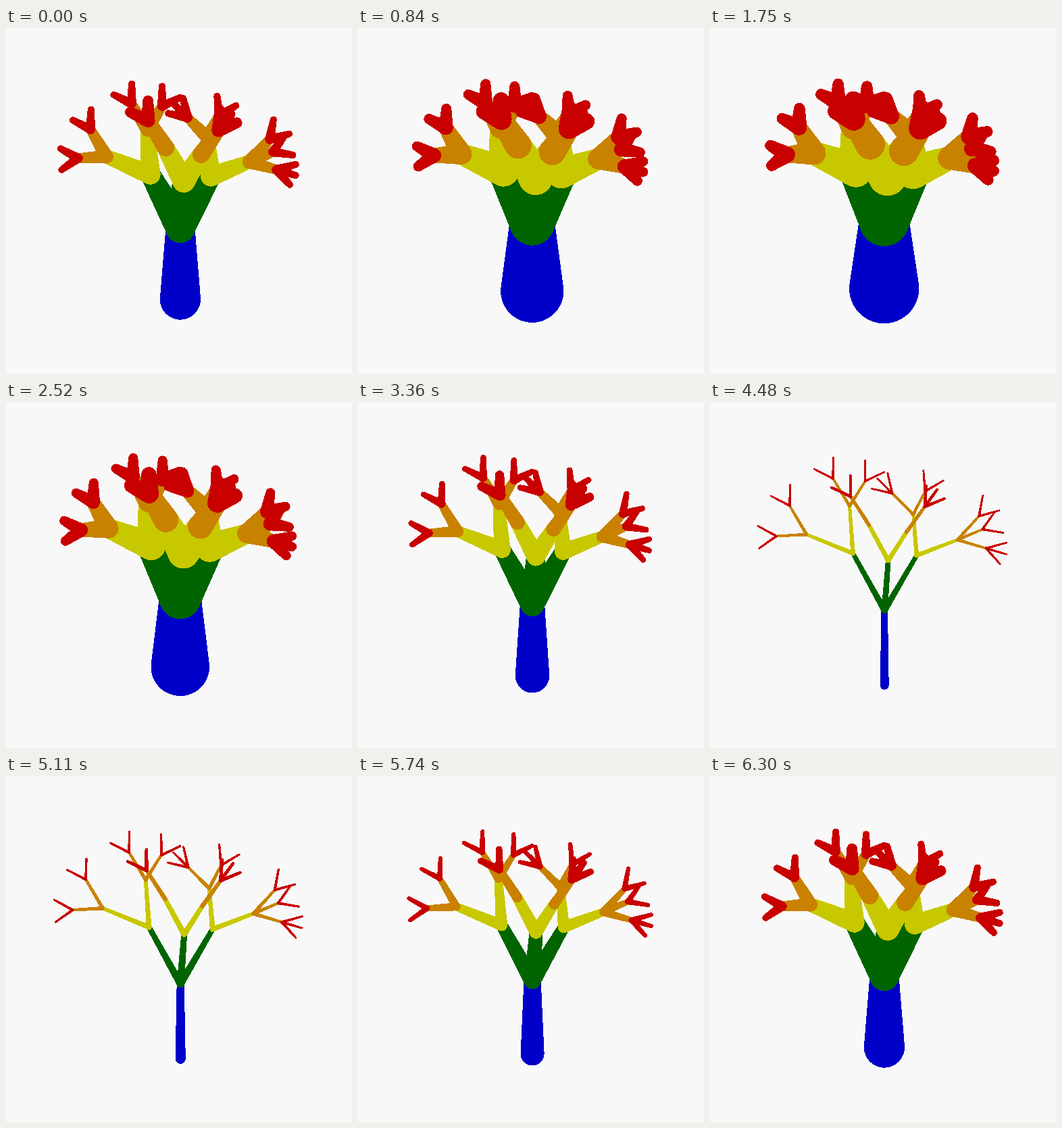
Write an HTML page that moves like this. It is 512 by 512 pixels and loops after 6.37 s.

```html
<!DOCTYPE html>
<html>
<head>
<meta charset="utf-8">
<style>
html, body { margin: 0; height: 100%; overflow: hidden; background: #f8f8f8; }
svg { display: block; width: 512px; height: 512px; }
</style>
</head>
<body>
<svg viewBox=".3 .3 512 512" shape-rendering="crispEdges"></svg>
<script>
const STEP = 70, STEPS = 91;
const TWIG = 31, FAN = 32 * Math.PI / 180;
const TRUNK_TAPER = .71, TAPER = .68, NEAR_TAPER = .77;

const joint = (x, y, ...children) => ({ x, y, children });

// A joint that ends in a fan of twigs around the direction it grew in.
const fan = (x, y, count = 2) => ({ x, y, count });

function sprout({ x, y, count }, from) {
  const dir = Math.atan2(y - from.y, x - from.x);
  return Array.from({ length: count }, (_, i) => {
    const angle = dir + FAN * (2 * i / (count - 1) - 1);
    return joint(x + TWIG * Math.cos(angle), y + TWIG * Math.sin(angle));
  });
}

const left = joint(212, 224,
  joint(143.5, 196, fan(118.5, 153.5), fan(99, 198.5)),
  joint(207, 154, fan(182.5, 113.5), fan(230, 117.5)));
const middle = joint(264, 234.5,
  joint(235.5, 182, fan(208.5, 140)),
  joint(291, 192.5, fan(318, 155, 3)));
const right = joint(306, 227,
  joint(301, 166.5, fan(270, 135.5, 3), fan(318.5, 132.5)),
  joint(366, 204, fan(398, 169), fan(403, 188.5), fan(408.5, 216.5, 3)));
const root = joint(258.5, 418.5, joint(258.5, 308, left, middle, right));

// Flatten the tree into tapered branches.
const branches = [];
function grow(from, to, width, taper, depth) {
  // The middle limb leans towards the viewer, so it seems to thin out less.
  if (to === middle) taper = NEAR_TAPER;
  const tipWidth = width * taper;
  branches.push({ from, to, width, tipWidth, depth });
  for (const child of to.children || sprout(to, from))
    grow(to, child, tipWidth, depth || to === middle ? taper : TAPER, depth + 1);
}
grow(root, root.children[0], 1, TRUNK_TAPER, 0);

const svg = document.querySelector('svg');
const levels = ['#0000c8', '#006400', '#c8c800', '#c88200', '#c80000'].map(color => {
  const path = document.createElementNS('http://www.w3.org/2000/svg', 'path');
  path.setAttribute('fill', color);
  return svg.appendChild(path);
});

// Outline of two circles joined by their outer tangents.
function capsule(x1, y1, r1, x2, y2, r2) {
  const dx = x2 - x1, dy = y2 - y1;
  const dir = Math.atan2(dy, dx);
  const spread = Math.acos((r1 - r2) / Math.hypot(dx, dy));
  const at = (x, y, r, a) => `${(x + r * Math.cos(a)).toFixed(2)} ${(y + r * Math.sin(a)).toFixed(2)}`;
  return `M${at(x1, y1, r1, dir + spread)}A${r1} ${r1} 0 1 1 ${at(x1, y1, r1, dir - spread)}` +
    `L${at(x2, y2, r2, dir - spread)}A${r2} ${r2} 0 0 1 ${at(x2, y2, r2, dir + spread)}Z`;
}

function draw(time) {
  const step = Math.floor(time / STEP) % STEPS;
  const girth = 26 * (1.2 + Math.sin(step / (STEPS - 1) * 2 * Math.PI));
  // The whole tree shrinks slightly as it thickens, to stay in view.
  const zoom = 1 / (1 + .00222 * (girth - 7.2));
  const place = ({ x, y }, width) =>
    [253.4 + (x - 253.4) * zoom, 89.8 + (y - 89.8) * zoom, width * girth * zoom + .5];

  levels.forEach((path, level) => path.setAttribute('d', branches
    .filter(b => b.depth === level)
    .map(b => capsule(...place(b.from, b.width), ...place(b.to, b.tipWidth)))
    .join('')));
}

const start = performance.now();
(function loop() {
  draw(performance.now() - start);
  requestAnimationFrame(loop);
})();
</script>
</body>
</html>
```
